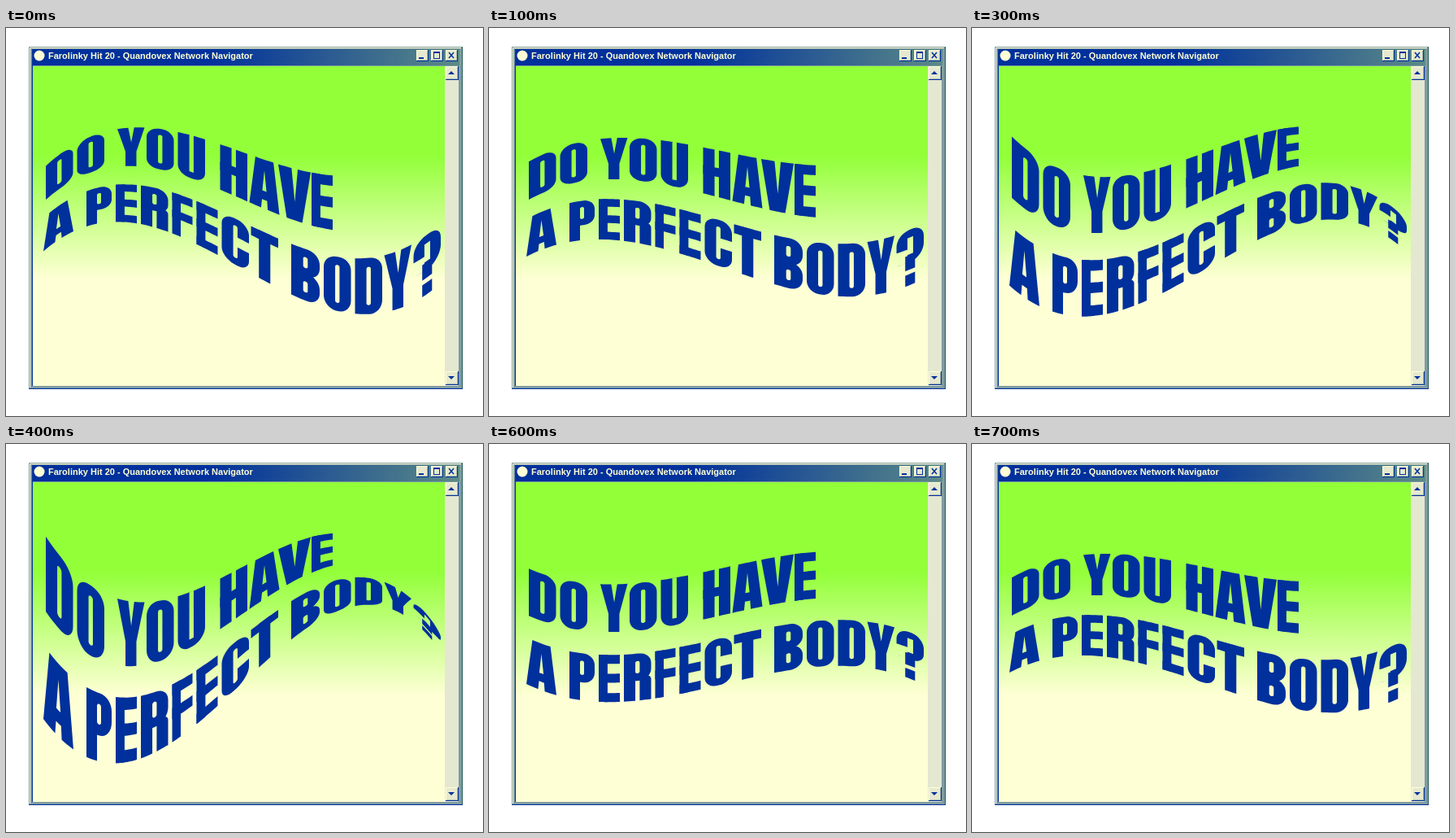
An HTML page with a canvas that plays this animation: 587 by 477 pixels, repeating every 800 ms.

```html
<!DOCTYPE html>
<html lang="en">
<head>
<meta charset="utf-8">
<title>Do you have a perfect body?</title>
<style>
  html, body { margin: 0; width: 100%; height: 100%; overflow: hidden; background: #fff; }
  canvas { display: block; }
</style>
</head>
<body>
<canvas id="stage" width="587" height="477"></canvas>
<script>
const ctx = document.getElementById('stage').getContext('2d');
const BLUE = '#00309c', CREAM = '#ffffd6', GREEN = '#92ff39';

// Glyph parts live on a 100 x 100 grid; contours in one part combine by even-odd.
const poly = (...n) => n.flatMap((v, i) => i % 2 ? [] : [[v, n[i + 1]]]);

// The mask tells which corners are round: top left, top right, bottom right, bottom left.
function box(x0, y0, x1, y1, mask = '0000') {
  const r = 0.45 * (x1 - x0), pts = [];
  [[x0, y0, 1, 1], [x1, y0, -1, 1], [x1, y1, -1, -1], [x0, y1, 1, -1]]
    .forEach(([x, y, sx, sy], k) => {
      if (mask[k] === '0') return pts.push([x, y]);
      for (let i = 0; i <= 8; i++) {
        const a = Math.PI * (1 + k / 2 + i / 16);
        pts.push([x + r * (sx + Math.cos(a)), y + r * 0.5 * (sy + Math.sin(a))]);
      }
    });
  return pts;
}

const slot = (y0, y1) => box(42, y0, 58, y1, '1111');
const bowl = (y0, y1) => [box(0, y0, 100, y1, '0110'), slot(y0 + 16, y1 - 16)];
const bar = y => [box(0, y, 100, y + 19)];
const stem = [box(0, 0, 42, 100)], leg = [box(0, 50, 42, 100)];
const ring = [box(0, 0, 100, 100, '1111'), slot(15, 85)];

const glyphs = {
  A: [[poly(20, 0, 80, 0, 100, 100, 61, 100, 59, 82, 42, 82, 39, 100, 0, 100),
       poly(50, 22, 57, 64, 43, 64)]],
  B: [bowl(0, 53), bowl(47, 100)],
  C: [[...ring, box(58, 39, 100, 60)]],
  D: [bowl(0, 100)],
  E: [stem, bar(0), bar(40), bar(81)],
  F: [stem, bar(0), bar(41)],
  H: [stem, [box(58, 0, 100, 100)], bar(38)],
  O: [ring],
  P: [bowl(0, 62), leg],
  R: [bowl(0, 58), leg, [box(58, 48, 100, 100, '0100')]],
  T: [bar(0), [box(29, 0, 71, 100)]],
  U: [[box(0, 0, 100, 100, '0011'), box(42, 0, 58, 85)]],
  V: [[poly(0, 0, 41, 0, 51, 64, 60, 0, 100, 0, 74, 100, 26, 100)]],
  Y: [[poly(0, 0, 40, 0, 51, 38, 62, 0, 100, 0, 70, 62, 70, 100, 30, 100, 30, 62)]],
  '?': [[box(0, 0, 100, 58, '1110'), box(40, 14, 61, 44), box(0, 34, 40, 58)],
        [box(32, 46, 68, 72)], [box(32, 80, 68, 100)]]
};
const widths = { E: 26, F: 25, P: 31, A: 37, V: 40, B: 35 };
const bearing = ch => ch === 'V' ? -1.5 : 'ATY'.includes(ch) ? 0 : 2.5;

// Sets a line from x; v0 and v1 are its share of the block height.
function layout(text, x, v0, v1) {
  x -= bearing(text[0]);
  return [...text].flatMap(ch => {
    if (ch === ' ') { x += 13.5; return []; }
    const left = x + bearing(ch), w = widths[ch] || 33.5;
    x = left + w + bearing(ch);
    return [{ parts: glyphs[ch], left, w, v0, v1 }];
  });
}
const letters = [
  ...layout('DO YOU HAVE', 49, 0, 0.405),
  ...layout('A PERFECT BODY?', 46, 0.6, 1)
];

// Swing of the wave and taper of the block, from crest to trough.
const poses = [[-148, -41], [-89, -28], [74, 0], [155, 43], [237, 86]];

// Side -1 is the top edge of the block, 1 the bottom edge.
function edge(t, side, [swing, taper]) {
  const tilt = 1 - 2 * t;
  return 223.5 + side * (143 + taper * tilt) / 2
    + 3 * swing * (1 + 0.04 * side) * t * (1 - t) * tilt;
}

function warp(x, v, pose) {
  const t = (x - 46) / 487;
  return edge(t, -1, pose) * (1 - v) + edge(t, 1, pose) * v;
}

function addContour(pts, place) {
  pts.forEach(([x, y], i) => {
    const [nx, ny] = pts[(i + 1) % pts.length];
    const steps = Math.ceil(Math.hypot(nx - x, ny - y) / 12);
    for (let k = 0; k < steps; k++) {
      const p = place(x + (nx - x) * k / steps, y + (ny - y) * k / steps);
      if (i || k) ctx.lineTo(...p); else ctx.moveTo(...p);
    }
  });
  ctx.closePath();
}

function drawWords(pose) {
  ctx.fillStyle = BLUE;
  for (const { parts, left, w, v0, v1 } of letters) {
    const place = (gx, gy) => {
      const x = left + w * gx / 100;
      return [x, warp(x, v0 + (v1 - v0) * gy / 100, pose)];
    };
    for (const part of parts) {
      ctx.beginPath();
      part.forEach(c => addContour(c, place));
      ctx.fill('evenodd');
    }
  }
}

function rect(x, y, w, h, color) {
  ctx.fillStyle = color;
  ctx.fillRect(x, y, w, h);
}

function fade(x0, y0, x1, y1, a, b) {
  const g = ctx.createLinearGradient(x0, y0, x1, y1);
  g.addColorStop(0, a);
  g.addColorStop(1, b);
  return g;
}

function button(x, y, w, h) {
  rect(x, y, w, h, BLUE);
  rect(x, y, w - 1, h - 1, CREAM);
  rect(x + 1, y + 1, w - 2, h - 2, '#a9bcb0');
  rect(x + 1, y + 1, w - 3, h - 3, '#e6e9cf');
}

function arrowButton(y, dir) {
  button(541, y, 16, 17);
  ctx.fillStyle = BLUE;
  ctx.beginPath();
  ctx.moveTo(544, y + 8 + 2 * dir);
  ctx.lineTo(552, y + 8 + 2 * dir);
  ctx.lineTo(548, y + 8 - 2 * dir);
  ctx.fill();
}

function drawWindow() {
  rect(0, 0, 587, 477, '#fff');
  rect(28, 23, 534, 421, '#7f9ba2');
  rect(29, 24, 531, 1, CREAM);
  rect(29, 24, 1, 418, CREAM);
  rect(561, 23, 1, 421, '#1f5a52');
  rect(28, 443, 534, 1, BLUE);
  rect(32, 46, 1, 394, BLUE);

  rect(32, 26, 526, 20, fade(250, 0, 558, 0, BLUE, '#5a8a86'));
  ctx.fillStyle = CREAM;
  ctx.beginPath();
  ctx.arc(41, 34, 6.5, 0, 7);
  ctx.fill();
  ctx.font = 'bold 11px "Liberation Sans", Arial, sans-serif';
  ctx.fillText('Farolinky Hit 20 - Quandovex Network Navigator', 52, 38);

  [505, 523, 541].forEach(x => button(x, 27, 15, 14));
  rect(508, 36, 6, 2, BLUE);
  rect(526, 29, 8, 9, BLUE);
  rect(527, 31, 6, 6, '#e6e9cf');
  ctx.strokeStyle = BLUE;
  ctx.lineWidth = 1.5;
  ctx.beginPath();
  ctx.moveTo(545, 30);
  ctx.lineTo(551, 37);
  ctx.moveTo(551, 30);
  ctx.lineTo(545, 37);
  ctx.stroke();

  rect(33, 47, 507, 393, fade(0, 157, 0, 310, GREEN, CREAM));
  rect(540, 47, 17, 393, '#e4e8d0');
  arrowButton(47, 1);
  arrowButton(422, -1);
}

function draw(now) {
  const step = Math.floor(now % 800 / 100);
  drawWindow();
  drawWords(poses[Math.min(step, 8 - step)]);
  requestAnimationFrame(draw);
}
draw(performance.now());
</script>
</body>
</html>
```
